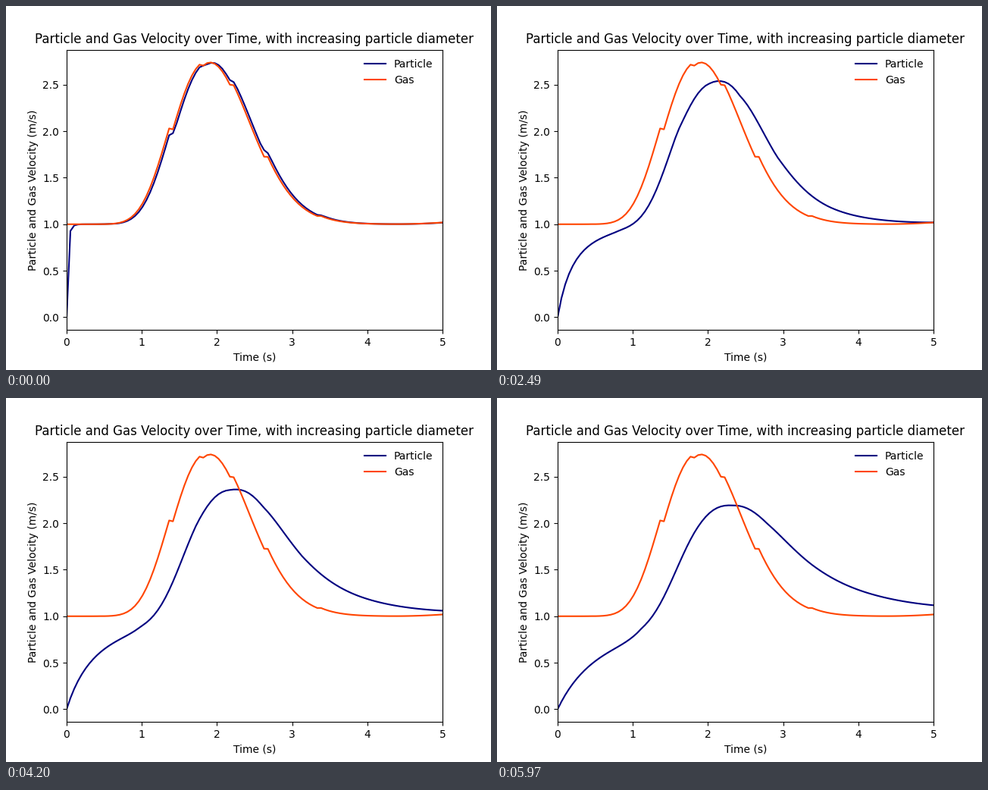
Write a matplotlib script that moves like this. It is 640 px wide and 480 px high and loops after 6000 ms.

```python
import numpy as np
import matplotlib.pyplot as plt
from matplotlib.animation import FuncAnimation

FRAMES = 200
SUBSTEPS = 20
t = np.linspace(0, 5, 100)


def gas_velocity(time, cell):
    """Skewed velocity pulse that reaches each cell a little later and weaker."""
    s = time - 0.052 * cell
    d = s - 1.755
    q = np.where(d < 0,
                 3.84 * np.log1p(np.minimum(d, 0) / 2.555),
                 5.65 * np.log1p(np.maximum(d, 0) / 3.7))
    pulse = (1.77 - 0.01 * cell) * np.exp(-q ** 2)
    return 1 + pulse + 0.04 * np.maximum(s - 3.95, 0) ** 2


def particle_velocities(size):
    """Velocity histories of particles dragged along from rest, one column per size."""
    x = np.zeros_like(size)
    v = np.zeros_like(size)
    h = (t[1] - t[0]) / SUBSTEPS
    history = [v.copy()]
    for start in t[:-1]:
        for k in range(SUBSTEPS):
            u = gas_velocity(start + (k + 0.5) * h, np.floor(x + 0.43))
            slip = u - v
            rate = (5 + 9.8 * np.abs(slip) ** 0.687) * size ** -1.26
            dv = slip * (1 - np.exp(-rate * h))
            x += (v + dv / 2) * h
            v += dv
        history.append(v.copy())
    return np.array(history)


# Samples at which the gas enters the next cell
entries = [10, 28, 36, 44, 53, 67, 86]
gas = gas_velocity(t, np.searchsorted(entries, np.arange(t.size), side="right"))
particles = particle_velocities((np.arange(FRAMES) + 9.5) / 37.5)

fig, ax = plt.subplots(figsize=(6.4, 4.8), dpi=100)
line, = ax.plot(t, particles[:, 0], color="navy", label="Particle")
ax.plot(t, gas, color="orangered", label="Gas")
ax.set_xlim(0, 5)
ax.set_ylim(-0.137, 2.877)
ax.set_xlabel("Time (s)")
ax.set_ylabel("Particle and Gas Velocity (m/s)")
ax.set_title("Particle and Gas Velocity over Time, with increasing particle diameter")
ax.legend(loc="upper right", frameon=False)


def update(i):
    line.set_ydata(particles[:, i])
    return line,


anim = FuncAnimation(fig, update, frames=FRAMES, interval=30, repeat=True, repeat_delay=0)
plt.show()
```
